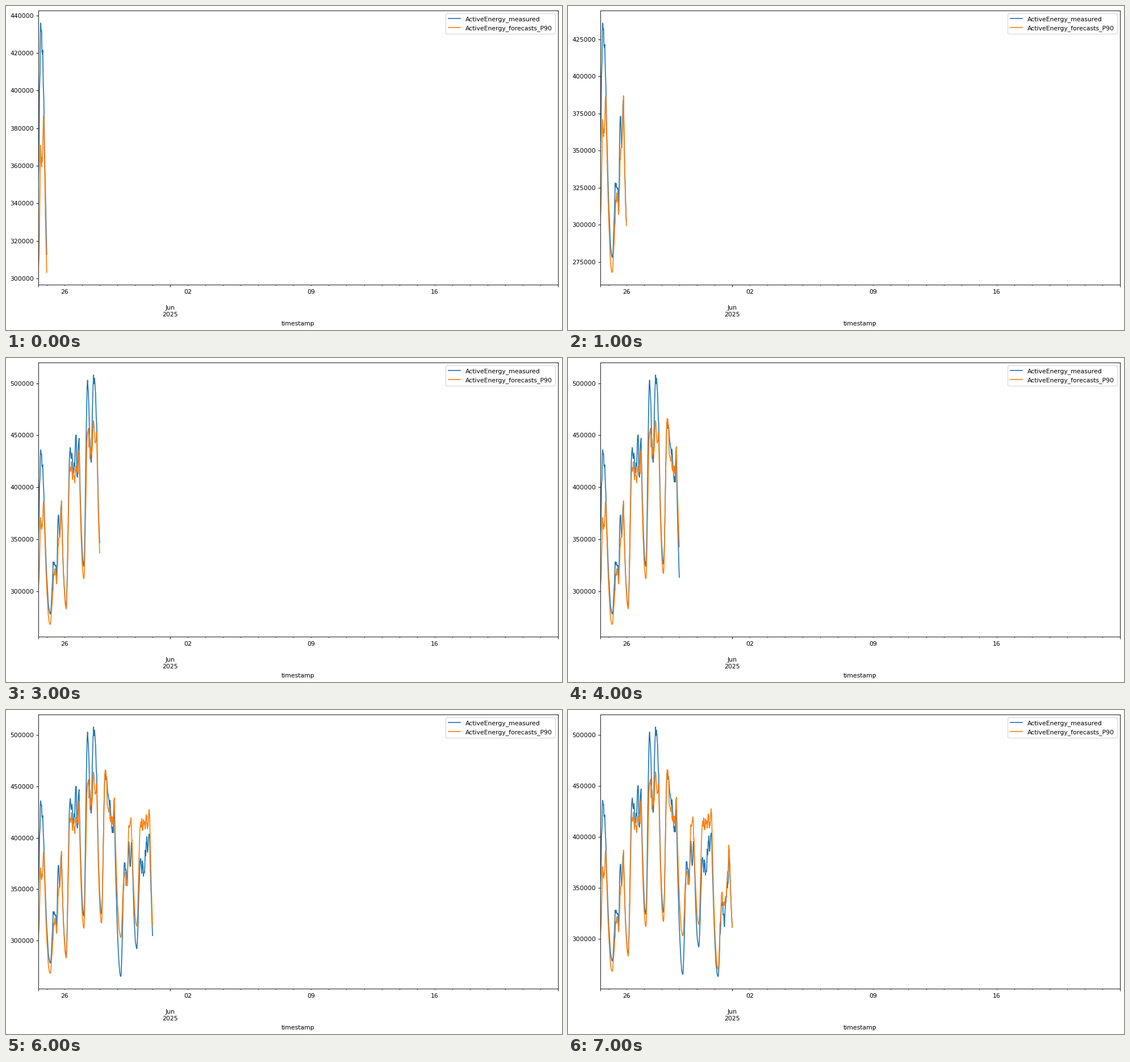
A matplotlib script that plays this animation: 979x572 px, repeating every 8 s.

```python
import matplotlib.pyplot as plt
import numpy as np
from matplotlib.animation import FuncAnimation

W, H, DPI = 979, 572, 80
LEFT, RIGHT, TOP, BOTTOM = 56.9, 972, 7.9, 492.4
DAYS = 8
START, END = 12.5, 30 * 24      # hours since midnight, 24 May
EVENING = 20

# Times of day: night low, morning, noon, afternoon, dip, evening
WORKDAY = [2.5, 7.5, 12.5, 15.75, 17.25, EVENING]
REST_DAY = [4.75, 10, 13.5, 15.75, 17.75, EVENING]
rest_days = {0, 1, 5, 7, 8}

# Turning points of each day in thousands; the first day starts after noon
measured = [
    [352, 436, 421, 395],
    [278, 328, 314, 373, 353, 384],
    [286, 435, 414, 448, 412, 447],
    [324, 503, 424, 508, 502, 462],
    [326, 463, 438, 415, 405, 427],
    [265, 375, 357, 396, 372, 394],
    [292, 380, 366, 396, 386, 402],
    [263, 334, 312, 340, 350, 387],
    [280],
]
forecast = [
    [304, 370, 362, 387],
    [268, 315, 307, 344, 352, 387],
    [283, 419, 411, 417, 415, 435],
    [312, 453, 432, 464, 448, 452],
    [317, 466, 425, 420, 415, 439],
    [303, 365, 353, 412, 416, 398],
    [314, 412, 413, 420, 414, 423],
    [270, 345, 333, 340, 366, 388],
    [279],
]

plt.rcParams.update({"font.family": "DejaVu Sans", "font.size": 9.84})
rng = np.random.default_rng(4)
hours = np.arange(START, DAYS * 24 + 0.01, 0.25)


def load_curve(days):
    """Ease between turning points, with seeded wiggles while people are awake."""
    points = []
    for day, values in enumerate(days):
        slots = REST_DAY if day in rest_days else WORKDAY
        if day == 0:
            slots = [START] + slots[3:]
        points += [(24 * day + hour, value) for hour, value in zip(slots, values)]
    t, v = np.array(points).T

    i = np.searchsorted(t, hours, side="right") - 1
    u = (hours - t[i]) / (t[i + 1] - t[i])
    falling_asleep = t[i] % 24 == EVENING
    eased = np.where(falling_asleep, 1 - (1 - u) ** 2, u * u * (3 - 2 * u))

    knots = np.arange(START, hours[-1] + 1, 0.75)
    wiggle = np.interp(hours, knots, rng.uniform(-1, 1, len(knots)))
    hour = hours % 24
    strength = np.where((hour > 7) & (hour < EVENING), 11, 2)
    curve = v[i] + (v[i + 1] - v[i]) * eased + strength * wiggle * 4 * u * (1 - u)
    return 1000 * np.clip(curve, v.min(), v.max())


series = {
    "ActiveEnergy_measured": load_curve(measured),
    "ActiveEnergy_forecasts_P90": load_curve(forecast),
}

fig = plt.figure(figsize=(W / DPI, H / DPI), dpi=DPI, facecolor="white")
ax = fig.add_axes([LEFT / W, 1 - BOTTOM / H, (RIGHT - LEFT) / W, (BOTTOM - TOP) / H])
lines = [ax.plot([], [], label=name)[0] for name in series]

ax.set_xlim(START, END)
ax.set_xticks([START, 8 * 24, END], ["", "\n\nJun\n2025", ""])
week_labels = {2: "26", 9: "02", 16: "09", 23: "16"}
minor_days = [d for d in range(1, 30) if d != 8]
ax.set_xticks([24 * d for d in minor_days],
              [week_labels.get(d, "") for d in minor_days], minor=True)
ax.tick_params(axis="x", which="major", pad=8)
ax.tick_params(axis="x", which="minor", pad=4.8)
ax.set_xlabel("timestamp", labelpad=5)
ax.legend(loc="upper right")


def update(day):
    shown = hours <= 24 * (day + 1)
    parts = [values[shown] for values in series.values()]
    for line, part in zip(lines, parts):
        line.set_data(hours[shown], part)
    low, high = np.min(parts), np.max(parts)
    margin = 0.05 * (high - low)
    ax.set_ylim(low - margin, high + margin)
    return lines


anim = FuncAnimation(fig, update, frames=DAYS, interval=1000, repeat=True, blit=False)
plt.show()
```
